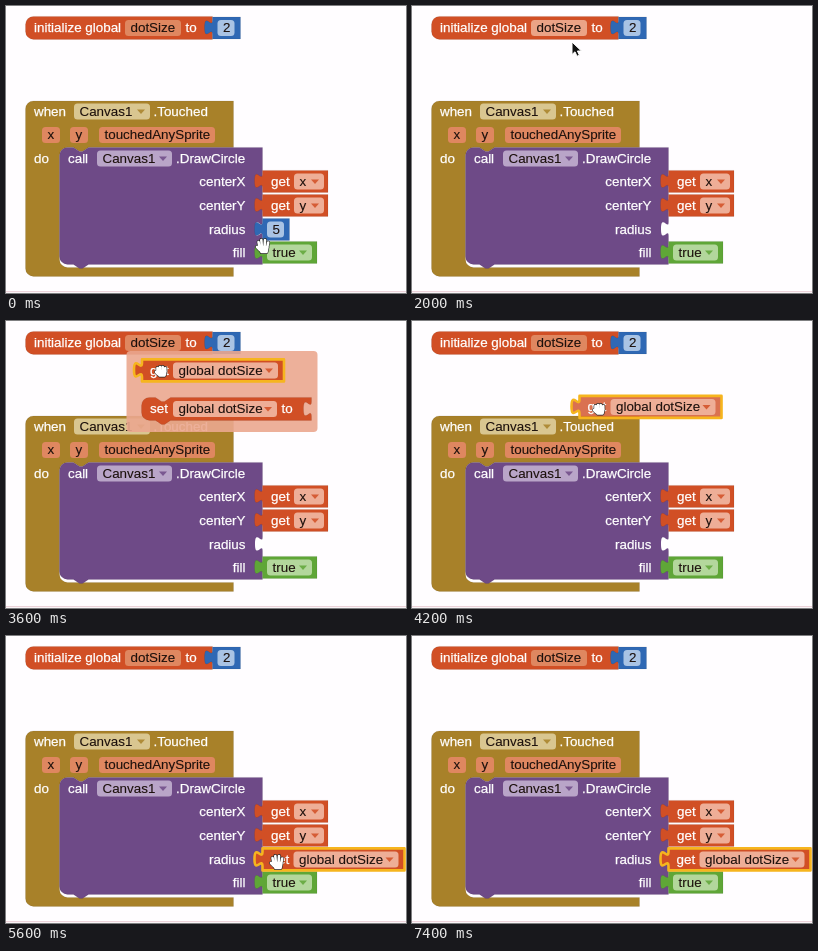
Write an HTML page that moves like this. It is 400 by 287 pixels and loops after 7600 ms.

```html
<!DOCTYPE html>
<html lang="en">
<head>
<meta charset="utf-8">
<title>Using a global variable in a block</title>
<style>
  html, body { margin: 0; width: 100%; height: 100%; overflow: hidden; background: #fffdff; }
  svg { display: block; width: 100vw; height: 100vh; }
  text { font: 13.4px "Liberation Sans", Arial, sans-serif; fill: #fff; stroke: #fff; stroke-width: .25; }
  text.dark { fill: #1c100c; stroke: #1c100c; stroke-width: .1; }
</style>
</head>
<body>
<svg id="stage" viewBox="0 0 400 287"></svg>
<script>
const LOOP = 7600, STEP = 200;
const RED = '#d14f25', GOLD = '#a88129', PURPLE = '#6e4a87', BLUE = '#2f68b4', GREEN = '#5fa637';
const PALE = { [RED]: '#eeae97', [BLUE]: '#a9c3e4', [GREEN]: '#b3d79c', [GOLD]: '#d9c690', [PURPLE]: '#b9a5c8' };
const NAME_FILL = '#df8760', NAME_HOVER = '#eba386';
const TAB = 'c0-10-8 8-8-7.5s8 2.5 8-7.5';

const group = (id, content) => `<g id="${id}">${content}</g>`;
const label = (x, middle, words, dark = false) =>
  `<text x="${x}" y="${middle + 4.6}"${dark ? ' class="dark"' : ''}>${words}</text>`;
const shape = (d, fill, extra = '') =>
  `<path d="${d}" fill="${fill}" stroke="#000" stroke-opacity=".15" stroke-width=".5" ${extra}/>`;
const box = (x, middle, width, fill, extra = '') =>
  `<rect x="${x}" y="${middle - 8}" width="${width}" height="16" rx="3.5" fill="${fill}" ${extra}/>`;
const field = (x, middle, width, words, color) =>
  box(x, middle, width, PALE[color]) + label(x + 5.5, middle, words, true);
const dropdown = (x, middle, width, words, color) => field(x, middle, width, words, color) +
  `<path d="M${x + width - 13} ${middle - 2}h8l-4 4.6z" fill="${color}" fill-opacity=".85"/>`;
const valuePath = (x, y, width) => `M${x} ${y}h${width}v22h${-width}v-4${TAB}z`;
const valueBlock = (x, middle, width, color, extra) => shape(valuePath(x, middle - 11, width), color, extra);
const glow = (x, middle, width) =>
  `<path d="${valuePath(x, middle - 11, width)}" fill="none" stroke="#f6b51e" stroke-width="2.6" stroke-linejoin="round"/>`;
const getter = (middle, name) =>
  valueBlock(257, middle, 65.5, RED) + label(265.5, middle, 'get') + dropdown(288.5, middle, 30, name, RED);
const globalGetter = id =>
  valueBlock(0, 11, 142, RED, `id="${id}"`) + label(8, 11, 'get') + dropdown(31, 11, 105, 'global dotSize', RED);

const declaration =
  shape('M28 11H207V34H28a8 8 0 0 1-8-8V19a8 8 0 0 1 8-8z', RED) +
  label(28.5, 22.5, 'initialize global') +
  box(119.5, 22.5, 56, NAME_FILL, 'id="nameBox"') + label(125, 22.5, 'dotSize', true) + label(180, 22.5, 'to') +
  valueBlock(207, 22.5, 28, BLUE) + field(212, 22.5, 17, '2', BLUE);

const eventBlock =
  shape('M28 95.5H228V142H83l-6 4h-3l-6-4H62a8 8 0 0 0-8 8V254a8 8 0 0 0 8 8H228V271H28a8 8 0 0 1-8-8V103.5a8 8 0 0 1 8-8z', GOLD) +
  label(28.5, 106, 'when') + dropdown(68.5, 106, 76, 'Canvas1', GOLD) + label(148, 106, '.Touched') +
  [[36.5, 18, 'x'], [64.5, 18, 'y'], [93.5, 116, 'touchedAnySprite']]
    .map(([x, width, name]) => box(x, 129.5, width, NAME_FILL) + label(x + 5.5, 129.5, name, true)).join('') +
  label(28.5, 153, 'do');

const callBlock =
  shape('M62 142h6l6 4h3l6-4H257V259H83l-6 4h-3l-6-4H62a8 8 0 0 1-8-8V150a8 8 0 0 1 8-8z', PURPLE) +
  label(62.5, 153, 'call') + dropdown(91.5, 153, 75, 'Canvas1', PURPLE) + label(170.5, 153, '.DrawCircle') +
  [['centerX', 176], ['centerY', 200], ['radius', 224], ['fill', 247]]
    .map(([name, y]) => label(240, y, name).replace('<text', '<text text-anchor="end"')).join('') +
  `<path d="M258 231h-.5${TAB}h.5z" fill="#fff"/>` +
  getter(176, 'x') + getter(200, 'y') +
  valueBlock(257, 247, 54.5, GREEN) + dropdown(261.5, 247, 45, 'true', GREEN);

const flyout =
  '<rect x="121" y="30.5" width="191" height="81" rx="4" fill="#eba88f" fill-opacity=".9"/>' +
  `<g transform="translate(136.5 39)">${globalGetter('flyoutGet')}</g>` +
  shape('M144 77h6l6 4h3l6-4H306v4c0 10-8-8-8 7.5s8-2.5 8 7.5v4H165l-6 4h-3l-6-4H144a8 8 0 0 1-8-8V85a8 8 0 0 1 8-8z', RED) +
  label(144.5, 88.5, 'set') + dropdown(167.5, 88.5, 104, 'global dotSize', RED) + label(276, 88.5, 'to');

const hand = (fingers, palm) => [['#222', 3.8], ['#fff', 2.6]].map(([color, width]) =>
  `<path d="${fingers}${palm}" fill="${color}" stroke="${color}" stroke-width="${width}" stroke-linecap="round" stroke-linejoin="round"/>`).join('');
const PALM = 'M-3.5 1H4.5L3.5 6H-1.5z';
const cursors = {
  open: hand('M-3.5 1L-4.5-4M-1.2 0L-1.7-6M1.6 0L2-6M4.3 1L5.2-3.5M-3 4L-6 1', PALM),
  fist: hand('M-3.5 0V-3M-1 0V-4M1.7 0V-4M4.3 0V-3M-3 3L-5 1', 'M-3.5 0H4.5L3.5 4.5H-1.5z'),
  arrow: '<path d="M0 0V12.5L3 9.8L5 14.3L7.4 13.2L5.4 9H9.4z" fill="#111" stroke="#fff" stroke-width="1"/>',
  beam: ['#fff', '#222'].map((color, i) =>
    `<path d="M-2.5-6.5Q0-6.5 0-4.5Q0-6.5 2.5-6.5M0-4.5V4.5M-2.5 6.5Q0 6.5 0 4.5Q0 6.5 2.5 6.5M-1.5 2H1.5" fill="none" stroke="${color}" stroke-width="${i ? 1 : 3}"/>`).join('')
};

const workspace = declaration + eventBlock + callBlock +
  group('five', valueBlock(257, 224, 27, BLUE) + field(261.5, 224, 17, '5', BLUE)) +
  group('fiveGlow', glow(257, 224, 27)) +
  group('flyout', flyout) +
  group('getBlock', globalGetter('getBody') + glow(0, 11, 142));

document.getElementById('stage').innerHTML =
  '<path d="M0 285.7H400" stroke="#ecd3da" stroke-width="1.2"/>' +
  `<g transform="translate(-.5 -.6)">${workspace}</g>` +
  Object.entries(cursors).map(([name, art]) => group(name, art)).join('');

// Each key is [time, x, y].
const pointerPath = [
  [0, 257, 240], [400, 263, 232], [1000, 263, 230], [1400, 232, 165], [1800, 168, 55],
  [2000, 160, 36], [2400, 157, 22], [2800, 157, 21.5], [3200, 156, 40], [3600, 155, 50],
  [4000, 172, 73], [4200, 187, 88], [4400, 207, 121], [4600, 238, 178], [4800, 265, 221],
  [5000, 271, 228], [5400, 271, 226], [6000, 271, 226], [6400, 292, 243], [7000, 388, 263]
];
const blockPath = [
  [3600, 136.5, 39], [4000, 153, 61], [4200, 168, 75.5], [4400, 188, 109], [4600, 219, 167],
  [4800, 247, 211], [5000, 253, 218], [5200, 254, 217]
];

function at(path, time) {
  const next = path.findIndex(key => key[0] > time);
  if (next < 0) return path[path.length - 1].slice(1);
  if (next === 0) return path[0].slice(1);
  const [t0, x0, y0] = path[next - 1], [t1, x1, y1] = path[next];
  const part = (time - t0) / (t1 - t0);
  return [x0 + (x1 - x0) * part, y0 + (y1 - y0) * part];
}

function pointerKind(t) {
  if (t < 1200) return 'open';
  if (t < 2400) return 'arrow';
  if (t < 3000) return 'beam';
  if (t < 3600) return 'open';
  if (t < 5400) return 'fist';
  if (t < 6600) return 'open';
  return t < 7000 ? 'arrow' : '';
}

const find = id => document.getElementById(id);
const show = (id, visible) => find(id).setAttribute('visibility', visible ? 'visible' : 'hidden');
const move = (id, [x, y]) => find(id).setAttribute('transform', `translate(${x} ${y})`);

function draw(now) {
  const t = Math.floor(now % LOOP / STEP) * STEP;
  const snapped = t >= 5400;
  show('five', t < 1000);
  show('fiveGlow', t >= 400 && t < 1000);
  show('flyout', t >= 2600 && t < 3800);
  show('getBlock', t >= 3600);
  find('nameBox').setAttribute('fill', t >= 2000 && t < 3000 ? NAME_HOVER : NAME_FILL);
  find('getBody').setAttribute('fill-opacity', snapped ? 1 : .8);
  move('getBlock', snapped ? [257, 213] : at(blockPath, t));
  for (const name in cursors) {
    show(name, name === pointerKind(t));
    move(name, at(pointerPath, t));
  }
}

const start = performance.now();
function tick() {
  draw(performance.now() - start);
  requestAnimationFrame(tick);
}
tick();
</script>
</body>
</html>
```
